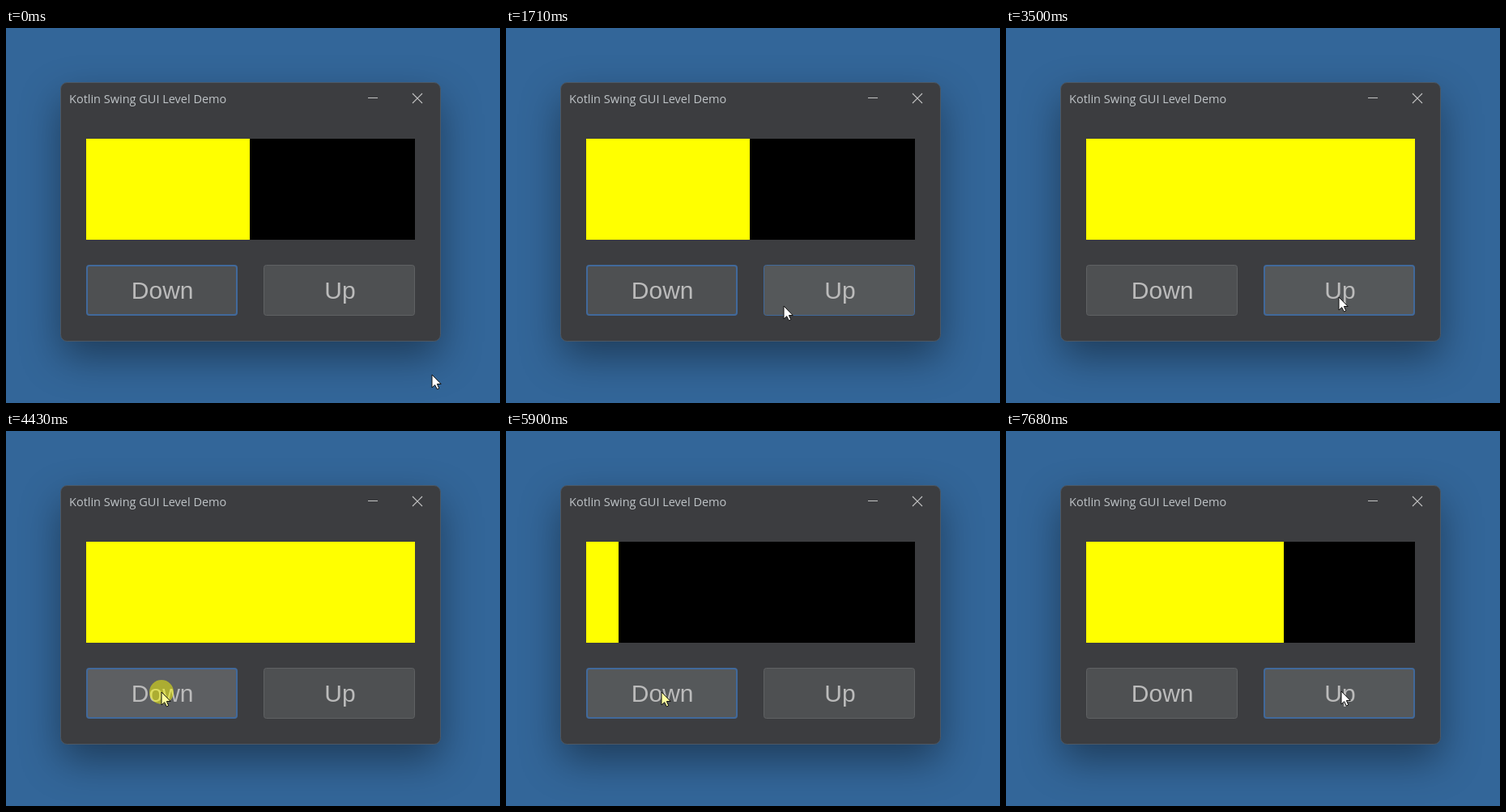
Animation of 610x464 px, one loop 8000 ms. Source, as an HTML page:

```html
<!DOCTYPE html>
<html lang="en">
<head>
<meta charset="utf-8">
<title>Level Demo</title>
<style>
  html, body { margin: 0; width: 100%; height: 100%; overflow: hidden; background: #336699; }
  #stage { position: relative; width: 610px; height: 464px; overflow: hidden; background: #336699; }
  #shadow {
    position: absolute; left: 68px; top: 68px; width: 468px; height: 319px;
    border-radius: 8px; box-shadow: 0 20px 50px rgba(0, 0, 0, .41);
  }
  svg { position: absolute; left: 0; top: 0; display: block; }
  .title { font: 14.5px "Open Sans", "Noto Sans", sans-serif; fill: #c0c5c8; }
  .label { font: 30px "Liberation Sans", Arial, sans-serif; fill: #bbb; text-anchor: middle; }
  .icon { fill: none; stroke: #c4c4c4; stroke-width: 1.1; }
</style>
</head>
<body>
<div id="stage">
  <div id="shadow"></div>
  <svg width="610" height="464" viewBox="0 0 610 464">
    <rect x="67.5" y="67.5" width="469" height="320" rx="8" fill="#3c3d40" stroke="#4c5865"/>
    <text class="title" x="78" y="93">Kotlin Swing GUI Level Demo</text>
    <path class="icon" d="M447 86.5H459M502 81l12 12M514 81l-12 12"/>
    <rect x="99" y="137" width="406" height="125" fill="#000"/>
    <rect id="level" x="99" y="137" height="125" fill="#ff0"/>
    <rect id="down"/>
    <text class="label" x="193.2" y="335">Down</text>
    <rect id="up"/>
    <text class="label" x="412.4" y="335">Up</text>
    <circle id="halo" r="15" fill="#ff0" fill-opacity=".49"/>
    <path id="cursor" d="M0 0V16L3.7 12.7L6.3 18L8.8 16.9L6.4 11.5H11.2Z"
          stroke="#111" stroke-linejoin="round"/>
  </svg>
</div>
<script>
const LOOP = 8000, TICK = 70, START_LEVEL = 5;
const BUTTON = { top: 293, width: 187, height: 63 };
const buttons = { down: 99, up: 318 };

const moves = [
  { from: 130, to: 880, x: 398, y: 408 },
  { from: 950, to: 1240, x: 297, y: 409 },
  { from: 1240, to: 1710, x: 343, y: 344 },
  { from: 1840, to: 2190, x: 411, y: 333 },
  { from: 3960, to: 4360, x: 192, y: 323 },
  { from: 6170, to: 6640, x: 414, y: 322 }
];

// evenly spaced clicks; the level changes on release
const bursts = [
  { id: "up", start: 2650, gap: 140, count: 2 },
  { id: "up", start: 2990, gap: 215, count: 3 },
  { id: "down", start: 4430, gap: 168, count: 10 },
  { id: "up", start: 6710, gap: 180, count: 6 }
];

const $ = id => document.getElementById(id);
const set = (el, attrs) => { for (const k in attrs) el.setAttribute(k, attrs[k]); };
const clamp = (v, lo, hi) => Math.min(hi, Math.max(lo, v));

function pointer(t) {
  let x = 526, y = 429;
  for (const m of moves) {
    const elapsed = Math.floor((t - m.from) / TICK) * TICK;
    const p = t >= m.to ? 1 : clamp(elapsed / (m.to - m.from), 0, 1);
    x += (m.x - x) * p;
    y += (m.y - y) * p;
  }
  return [Math.round(x), Math.round(y)];
}

function clickState(t) {
  const state = { level: START_LEVEL, focus: "down", held: null, tinted: false };
  for (const { id, start, gap, count } of bursts) {
    if (t < start) break;
    const age = t - start;
    const released = clamp(Math.floor((age - TICK) / gap) + 1, 0, count);
    state.focus = id;
    state.level += id === "up" ? released : -released;
    state.tinted = released < count || id === "up" && t < 3960 && start < 2990;
    if (released < count && age % gap < TICK) state.held = id;
  }
  return state;
}

// whole logical pixels at 125 % display scale
const barWidth = level => Math.round(Math.floor(level * 32.5) * 1.25 - .01);

function drawButton(id, focused, hovered, pressed) {
  const line = focused ? 2 : 1;
  set($(id), {
    x: buttons[id] + line / 2, y: BUTTON.top + line / 2,
    width: BUTTON.width - line, height: BUTTON.height - line, rx: 3,
    fill: pressed ? "#5d5f62" : hovered ? "#55585a" : "#4e5052",
    stroke: focused || hovered ? "#41699b" : "#5f6163", "stroke-width": line
  });
}

function draw(t) {
  const [x, y] = pointer(t);
  const { level, focus, held, tinted } = clickState(t);
  set($("level"), { width: barWidth(level) });
  for (const id in buttons) {
    const dx = x - buttons[id], dy = y - BUTTON.top;
    const over = dx >= 0 && dx < BUTTON.width && dy >= 0 && dy < BUTTON.height;
    drawButton(id, focus === id, over, held === id);
  }
  set($("halo"), { cx: x, cy: y, visibility: held ? "visible" : "hidden" });
  set($("cursor"), { transform: `translate(${x} ${y})`, fill: tinted ? "#ffffa0" : "#fff" });
}

const begin = performance.now();
function frame() {
  draw((performance.now() - begin) % LOOP);
  requestAnimationFrame(frame);
}
frame();
</script>
</body>
</html>
```
